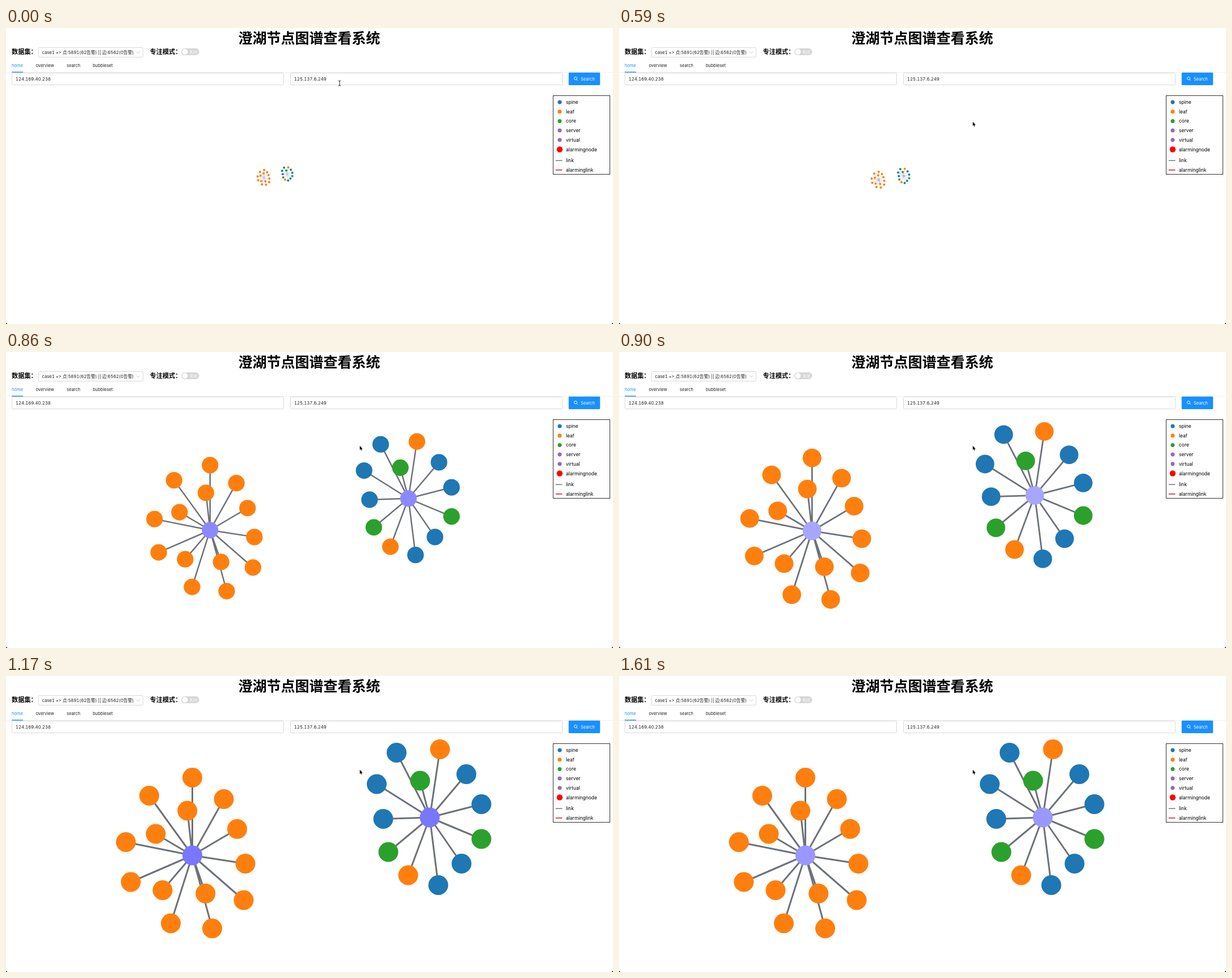
An HTML page with a canvas for the animation above (1670 ms loop, 1070 by 523 pixels).

```html
<!DOCTYPE html>
<html lang="zh">
<head>
<meta charset="utf-8">
<title>节点图谱</title>
<style>
  html, body { margin: 0; width: 100%; height: 100%; overflow: hidden; background: #fff; }
  svg, canvas { position: absolute; left: 0; top: 0; width: 1070px; height: 523px; }
  text {
    font-family: Inter, "Noto Sans CJK SC", "Noto Sans CJK", sans-serif;
    font-size: 7.5px; font-feature-settings: "tnum", "calt" 0; fill: #222;
  }
  .title, .label { font-family: "Noto Sans CJK SC", "Noto Sans CJK", sans-serif; font-weight: 700; fill: #000; }
  .title { font-size: 25px; text-anchor: middle; }
  .label { font-size: 11.2px; }
  .value { font-size: 7.8px; }
  .legend text { font-size: 8.5px; fill: #000; }
  .box { fill: #fff; stroke: #d9d9d9; }
</style>
</head>
<body>
<svg viewBox="0 0 1070 523">
  <text class="title" x="534.5" y="26.7">澄湖节点图谱查看系统</text>
  <text class="label" x="10" y="46.2">数据集：</text>
  <rect class="box" x="57.5" y="34.5" width="184" height="17" rx="1"/>
  <text x="63.5" y="45.8" style="font-size:7.65px">case1 =&gt; 点:5891(62告警) || 边:6562(0告警)</text>
  <path d="M230 41.5l3 3.2l3-3.2" fill="none" stroke="#bfbfbf" stroke-width=".9"/>
  <text class="label" x="253.5" y="46.2">专注模式：</text>
  <rect x="309" y="36" width="31.5" height="12" rx="6" fill="#d5d5d5"/>
  <circle cx="315.4" cy="42" r="5" fill="#fff"/>
  <text x="323" y="44.6" style="font-size:7px;fill:#fff">关闭</text>

  <text x="10" y="68.5" style="fill:#1890ff">home</text>
  <text x="52.5" y="68.5">overview</text>
  <text x="107" y="68.5">search</text>
  <text x="153" y="68.5">bubbleset</text>
  <path d="M0 78.5H1070" stroke="#f0f0f0"/>
  <rect x="10" y="77.2" width="20" height="1.4" fill="#1890ff"/>

  <rect class="box" x="10.5" y="79.5" width="479" height="21" rx="1"/>
  <rect class="box" x="501.5" y="79.5" width="479" height="21" rx="1"/>
  <text class="value" x="17" y="93">124.169.40.238</text>
  <text class="value" x="508" y="93">125.137.6.249</text>
  <rect x="991.8" y="78.8" width="55.4" height="22.2" rx="1.4" fill="#1890ff"/>
  <g fill="none" stroke="#fff" stroke-width=".9">
    <circle cx="1004" cy="89" r="2.5"/><path d="M1005.8 90.8l2.3 2.3"/>
  </g>
  <text x="1013" y="92.7" style="fill:#fff">Search</text>

  <g class="legend">
    <rect x="964.5" y="119.5" width="100" height="139" fill="#fff" stroke="#333"/>
    <circle cx="976" cy="131" r="3.5" fill="#1f77b4"/><text x="987" y="134">spine</text>
    <circle cx="976" cy="147.7" r="3.5" fill="#ff7f0e"/><text x="987" y="150.7">leaf</text>
    <circle cx="976" cy="164.4" r="3.5" fill="#2ca02c"/><text x="987" y="167.4">core</text>
    <circle cx="976" cy="181.1" r="3.5" fill="#9467bd"/><text x="987" y="184.1">server</text>
    <circle cx="976" cy="197.8" r="3.5" fill="#9467bd"/><text x="987" y="200.8">virtual</text>
    <circle cx="976" cy="214.5" r="5.2" fill="#f00"/><text x="987" y="217.5">alarmingnode</text>
    <path d="M969 234.2h11.5" stroke="#777" stroke-width="1.5"/><text x="987" y="237">link</text>
    <path d="M969 250.9h11.5" stroke="#d01818" stroke-width="1.5"/><text x="987" y="253.8">alarminglink</text>
  </g>
  <path d="M0 519.5Q.4 522.6 3.5 523H0zM1070 519.5Q1069.6 522.6 1066.5 523H1070z"/>
</svg>
<canvas id="stage"></canvas>
<script>
const LOOP = 1670;
const WIDTH = 1060, MID = [530, 314];
const BLUE = '#1f77b4', ORANGE = '#ff7f0e', GREEN = '#2ca02c';

// Hubs and their leaves, in world units (scale 1)
const hubs = [
  { x: 328.5, y: 317, leaves: [
    [328.5, 179.5], [252.5, 211.5], [384, 217.5], [319.7, 238], [407.5, 270.3],
    [264, 279], [211.3, 293.5], [422, 331.5], [220, 364], [276, 378.5],
    [351.7, 384.3], [419, 396], [290.5, 437], [363.5, 446]
  ] },
  { x: 747, y: 250, leaves: [
    [688.5, 135.5, BLUE], [765, 129.5, ORANGE], [811.5, 173.5, BLUE], [730, 185, GREEN],
    [653.5, 191, BLUE], [838, 226.5, BLUE], [665, 252.5, BLUE], [838, 288, GREEN],
    [674, 311, GREEN], [803, 331.5, BLUE], [709, 352, ORANGE], [762, 369.5, BLUE]
  ] }
];

const canvas = document.getElementById('stage');
const ctx = canvas.getContext('2d');
const dpr = window.devicePixelRatio || 1;
canvas.width = 1070 * dpr;
canvas.height = 523 * dpr;

const clamp = v => Math.min(1, Math.max(0, v));
const cubic = u => u < .5 ? 4 * u ** 3 : 1 - 4 * (1 - u) ** 3;

// Smooth zoom along a hyperbolic path between two views [x, y, width]
function zoomPath(a, b) {
  const dx = b[0] - a[0], dy = b[1] - a[1], d = Math.hypot(dx, dy);
  const w0 = a[2], w1 = b[2], diff = w1 * w1 - w0 * w0;
  const angle = (w, q) => Math.asinh(-(diff + q * 4 * d * d) / (4 * w * d));
  const r0 = angle(w0, 1), r1 = angle(w1, -1);
  return e => {
    const r = r0 + (r1 - r0) * e;
    const p = w0 / (2 * d) * (Math.cosh(r0) * Math.tanh(r) - Math.sinh(r0));
    return [a[0] + p * dx, a[1] + p * dy, w0 * Math.cosh(r0) / Math.cosh(r)];
  };
}
const viewAt = zoomPath([1097.7, 824.7, WIDTH / .0975], [...MID, WIDTH]);

function disc(x, y, r, fill) {
  ctx.fillStyle = fill;
  ctx.beginPath();
  ctx.arc(x, y, r, 0, 7);
  ctx.fill();
}

function drawGraph(t) {
  const [cx, cy, w] = viewAt(cubic(clamp((t - 485) / 512)));
  const k = WIDTH / w, r = Math.max(2, 17.5 * k);
  const sx = x => MID[0] + (x - cx) * k;
  const sy = y => MID[1] + (y - cy) * k;

  const glow = .5 + .5 * Math.cos((t - 1000) / 245 * Math.PI);
  const red = Math.round(98 + 109 * glow);
  const hubFill = `rgb(${red},${red - 3},${Math.round(255 - 8 * glow ** 4)})`;

  ctx.strokeStyle = '#6c717a';
  ctx.lineWidth = 3 * k;
  ctx.beginPath();
  for (const h of hubs) for (const [x, y] of h.leaves) {
    ctx.moveTo(sx(h.x), sy(h.y));
    ctx.lineTo(sx(x), sy(y));
  }
  ctx.stroke();
  for (const h of hubs) {
    for (const [x, y, fill = ORANGE] of h.leaves) disc(sx(x), sy(y), r, fill);
    disc(sx(h.x), sy(h.y), r, hubFill);
  }
}

const arrow = new Path2D('M0 0V7.4L1.6 5.9L2.8 8.6L3.9 8.1L2.8 5.5H5Z');
const beam = new Path2D('M-2-4.5Q0-4.5 0-3.2Q0-4.5 2-4.5M0-3.2V3.2M-2 4.5Q0 4.5 0 3.2Q0 4.5 2 4.5');

function drawCursor(t) {
  const e = cubic(clamp((t - 20) / 530));
  const x = 588 + 35.7 * e, y = 97.5 + 68.2 * e;
  ctx.save();
  ctx.translate(x, y);
  if (y < 101) {
    ctx.strokeStyle = '#222';
    ctx.lineWidth = 1;
    ctx.stroke(beam);
  } else {
    ctx.strokeStyle = '#fff';
    ctx.lineWidth = 1;
    ctx.stroke(arrow);
    ctx.fillStyle = '#000';
    ctx.fill(arrow);
  }
  ctx.restore();
}

// The screen refreshes about every 34.6 ms, on a 10 ms clock
const floor10 = v => Math.floor(v / 10) * 10;
function tick(t) {
  if (t >= 1140) return t;
  const n = Math.floor((floor10(t) + 9.99 - 590) / 34.6);
  return floor10(590 + 34.6 * n);
}

const start = performance.now();
function frame() {
  const t = tick((performance.now() - start) % LOOP);
  ctx.setTransform(dpr, 0, 0, dpr, 0, 0);
  ctx.clearRect(0, 0, 1070, 523);
  drawGraph(t);
  drawCursor(t);
  requestAnimationFrame(frame);
}
frame();
</script>
</body>
</html>
```
